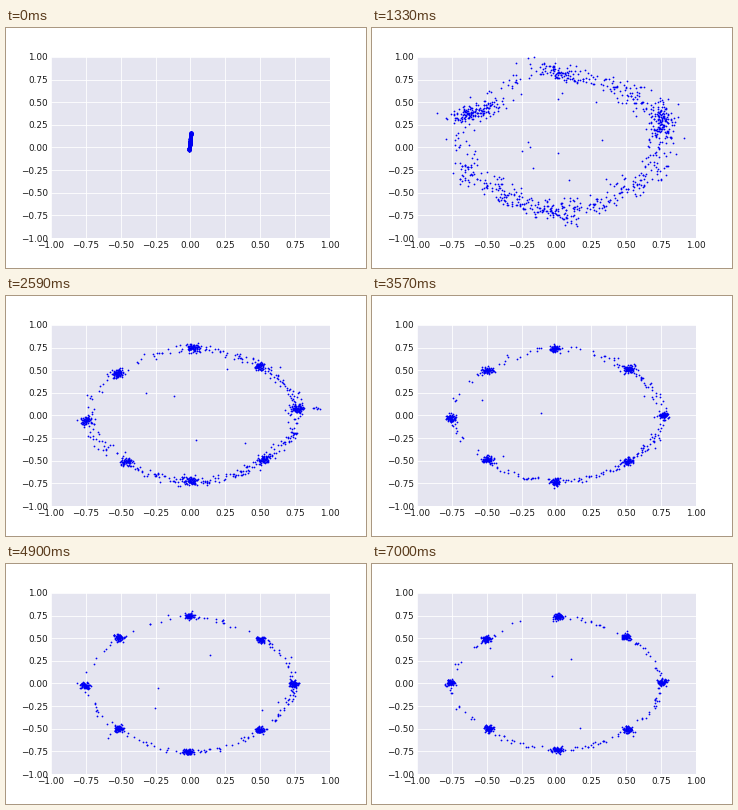
A matplotlib script that plays this animation: 360 px wide and 240 px high, repeating every 7.07 s.

```python
import numpy as np
import matplotlib.pyplot as plt
from matplotlib.animation import FuncAnimation

FRAMES, STEP = 101, 70
GROWTH = 8      # frames until the first streak has opened into a ring
LOBED = 19      # frame at which the ring is most lopsided
MODES = 8

COMPASS = np.arange(MODES) * 2 * np.pi / MODES
# Share of points each mode holds while the ring is lopsided, from east
LOBES = np.array([1.5, .15, 1, 1.9, .4, .3, .8, .15])
PHASES = np.random.default_rng(5).uniform(0, 2 * np.pi, (2, MODES))


def polar(rad, ang):
    return np.column_stack([rad * np.cos(ang), rad * np.sin(ang)])


def decay(k, start, span):
    """1 until start, then falling off exponentially."""
    return np.exp(-max(k - start, 0) / span)


def ring(k, skew):
    """Radius and angle of each mode, swaying gently about its home."""
    rad = .73 + .02 * np.cos(4 * COMPASS)
    rad = rad + .08 * skew * np.cos(COMPASS - np.pi / 4)
    rad = rad + .013 * np.sin(.9 * k + PHASES[0])
    ang = COMPASS + np.radians(10) * skew * (1 + np.cos(2 * COMPASS))
    return rad, ang + .022 * np.sin(.7 * k + PHASES[1])


def streak(n, rng):
    y = rng.uniform(-.035, .17, n)
    x = -.007 + .07 * y + rng.uniform(-.007, .007, n)
    return np.column_stack([x, y])


def samples(k):
    rng = np.random.default_rng(400 + k)
    skew = decay(k, LOBED, 12)
    bridging = decay(k, 30, 18)
    blur = max(0, 1 - k / LOBED)

    rad, ang = ring(k, skew)
    mode_n = 75 * (1 + skew * (LOBES - 1))
    mode_sd = .017 + .024 * skew + .13 * blur
    arc_n = (16 + 38 * bridging) * (1 + .55 * np.cos(COMPASS + np.pi / 3))
    arc_sd = .014 + .01 * bridging + .03 * skew + .13 * blur

    parts = []
    for i in range(MODES):
        # Modes under formation are smeared along a slanted tangent
        n = int(mode_n[i])
        smear = rng.normal(0, .1 * skew ** 2, n)
        pts = polar(rad[i], [ang[i]]) + polar(smear, ang[i] + np.pi / 3)
        parts.append(pts + rng.normal(0, mode_sd, (n, 2)))

        # Points in transit to the next mode
        n, j = int(arc_n[i]), (i + 1) % MODES
        t = rng.random(n)
        turn = (ang[j] - ang[i]) % (2 * np.pi)
        path = polar(rad[i] + t * (rad[j] - rad[i]), ang[i] + t * turn)
        parts.append(path + rng.normal(0, arc_sd, (n, 2)))

    # A few points fall inside the ring
    n = int(5 + 12 * skew)
    parts.append(polar(.7 * np.sqrt(rng.random(n)),
                       rng.uniform(0, 2 * np.pi, n)))

    # A short tail leaves one mode outwards
    i = rng.integers(MODES)
    tail = rad[i] * (1 + rng.random(6) * rng.uniform(.05, .22))
    parts.append(polar(tail, ang[i] + rng.normal(0, .015, 6)))

    pts = np.vstack(parts)
    grow = min(1, k / GROWTH) ** 1.2
    pts = (1 - grow) * streak(len(pts), rng) + grow * pts
    return np.clip(pts, [-1.01, -1.08], [1, 1.01])


plt.rcParams.update({"font.family": "DejaVu Sans", "font.size": 10.6})
fig = plt.figure(figsize=(6, 4), dpi=60, facecolor="white")
ax = fig.add_axes([.125, .125, .7745, .7545], facecolor="#e5e5f0")
ax.set(xlim=(-1, 1), ylim=(-1, 1))
ticks = np.linspace(-1, 1, 9)
ax.set_xticks(ticks)
ax.set_yticks(ticks)
ax.tick_params(length=0, pad=3.5, labelcolor="#1a1a1a")
ax.grid(color="white", linewidth=1)
ax.set_axisbelow(True)
for spine in ax.spines.values():
    spine.set_visible(False)
dots = ax.scatter([], [], s=4.5, color="#0000f4", linewidths=0,
                  clip_on=False, zorder=3)


def draw(k):
    dots.set_offsets(samples(k))
    return dots,


anim = FuncAnimation(fig, draw, frames=FRAMES, interval=STEP,
                     init_func=lambda: draw(0), repeat=True, repeat_delay=0)
plt.show()
```
